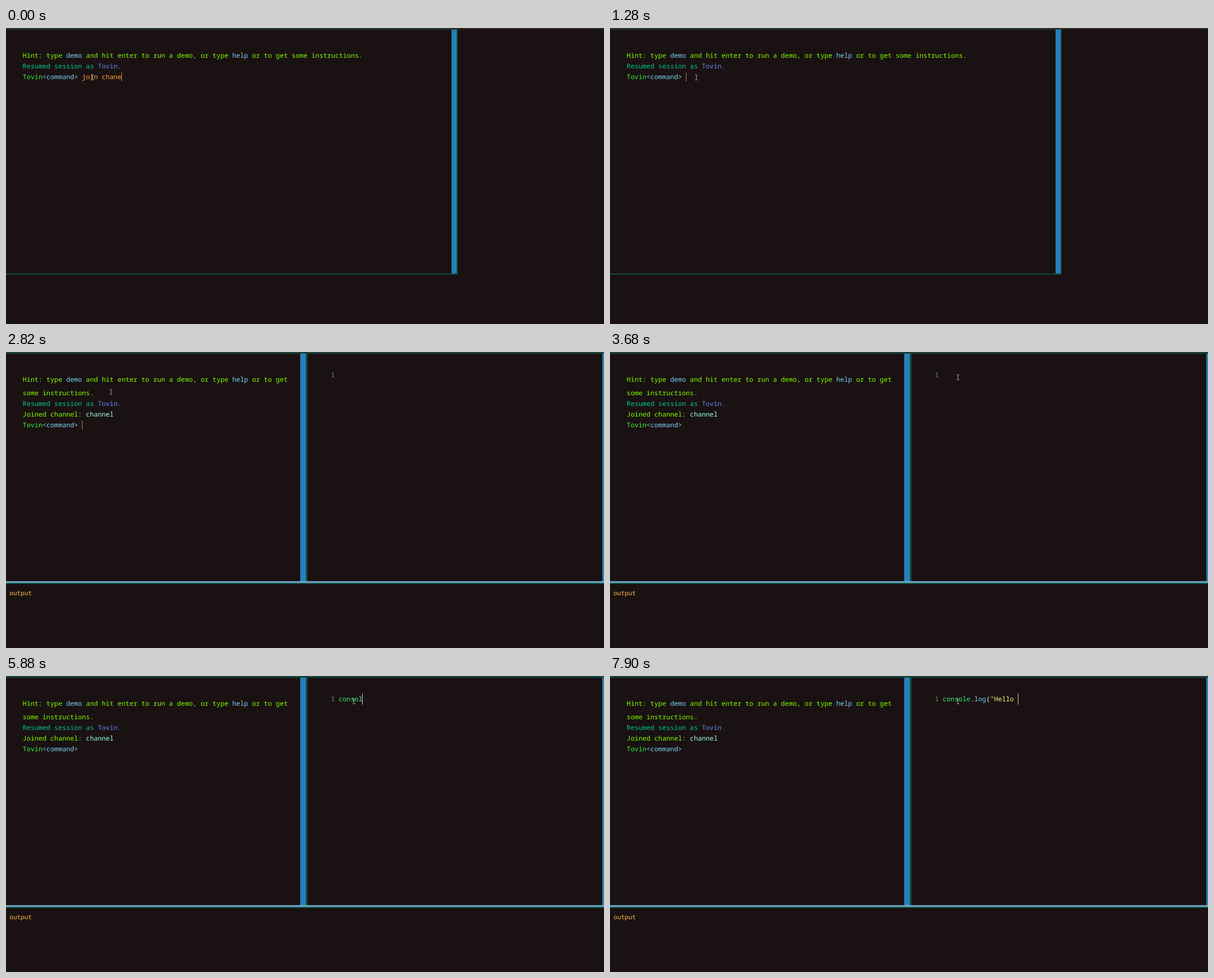
Write an HTML page that moves like this. It is 1063 by 527 pixels and loops after 8 s.

```html
<!DOCTYPE html>
<html lang="en">
<head>
<meta charset="utf-8">
<title>Terminal and editor</title>
<style>
  html, body { margin: 0; width: 100%; height: 100%; overflow: hidden; background: #1a1112; }
  svg { display: block; width: 100%; height: 100%; }
  rect { shape-rendering: crispEdges; }
  text {
    font: 11.73px "Noto Sans Mono", "DejaVu Sans Mono", monospace;
    white-space: pre;
    text-rendering: geometricPrecision;
  }
  .hint { fill: #7fff00; }
  .key { fill: #78d5f5; }
  .info { fill: #00c896; }
  .user { fill: #5f8ff5; }
  .prompt { fill: #3cf53c; }
  .mode { fill: #80d2f2; }
  .input { fill: #ffa53a; }
  .chan { fill: #a0fff0; }
  .line { fill: #818778; }
  .object { fill: #3ceb78; }
  .plain { fill: #f0f0e6; }
  .method { fill: #6ecdfa; }
  .string { fill: #fff578; }
  .output { fill: #ffc04a; font-size: 11px; }
</style>
</head>
<body>
<svg id="stage" viewBox="0 0 1063 527" preserveAspectRatio="none">
  <rect width="1063" height="527" fill="#1a1112"/>
  <rect width="1063" height="2" fill="#2d2a2a"/>
  <g id="single"></g>
  <g id="split"></g>
  <rect id="caret" width="1"/>
  <path id="pointer" d="M-2.5 -4.5H-.5M.5 -4.5H2.5M0 -4V4M-2.5 4.5H-.5M.5 4.5H2.5" fill="none" stroke="#b4aeae"/>
</svg>
<script>
const LOOP = 8000, SPLIT_AT = 1540, CLICK_AT = 3190;
const ADVANCE = 7.037, LEFT = 29.6, CODE_X = 591.3;
const GREEN = '#0f4d40', BLUE = '#2680b8', PALE = '#9fd0ee';
const USER = 'Tovin';
const $ = id => document.getElementById(id);

function add(parent, tag, attrs, content = '') {
  const el = document.createElementNS('http://www.w3.org/2000/svg', tag);
  for (const name in attrs) el.setAttribute(name, attrs[name]);
  el.textContent = content;
  parent.appendChild(el);
  return el;
}

const box = (parent, x, y, width, height, fill) =>
  add(parent, 'rect', { x, y, width, height, fill });

// Each part is [class, string]; returns the spans for later updates.
function write(parent, x, y, ...parts) {
  const line = add(parent, 'text', { x, y });
  return parts.map(([cls, str]) => add(line, 'tspan', { class: cls }, str));
}

const hintStart = [['hint', 'Hint: type '], ['key', 'demo'],
  ['hint', ' and hit enter to run a demo, or type '], ['key', 'help']];
const session = [['info', 'Resumed session as '], ['user', USER], ['info', '.']];
const prompt = [['prompt', USER], ['mode', '<command> ']];

const single = $('single');
box(single, 0, 2, 803, 1, GREEN);
box(single, 801, 2, 2, 437, GREEN);
box(single, 0, 437, 803, 2, GREEN);
box(single, 792, 3, 9, 434, BLUE);
write(single, LEFT, 53, ...hintStart, ['hint', ' or to get some instructions.']);
write(single, LEFT, 72, ...session);
const command = write(single, LEFT, 91, ...prompt, ['input', '']).pop();

const split = $('split');
box(split, 0, 1, 1063, 2, GREEN);
box(split, 523, 3, 10, 405, BLUE);
box(split, 533, 3, 3, 405, GREEN);
box(split, 1060, 3, 3, 405, BLUE);
box(split, 0, 408, 1063, 1, PALE);
box(split, 0, 409, 1063, 1, '#1d5f8c');
box(split, 0, 410, 1063, 1, PALE);
box(split, 0, 411, 1063, 2, GREEN);
write(split, LEFT, 53, ...hintStart, ['hint', ' or to get']);
write(split, LEFT, 77, ['hint', 'some instructions.']);
write(split, LEFT, 96, ...session);
write(split, LEFT, 115, ['hint', 'Joined channel: '], ['chan', 'channel']);
write(split, LEFT, 134, ...prompt);
write(split, 577.5, 45, ['line', '1']);
write(split, 6.3, 433, ['output', 'output']);

const code = [['object', 'console'], ['plain', '.'], ['method', 'log'],
  ['plain', '('], ['string', '"Hello ']];
const codeSpans = write(split, CODE_X, 45, ...code.map(([cls]) => [cls, '']));

// Values that hold from the given time on.
const commands = [[0, 'join chane'], [260, 'join chanel'], [760, 'join chane'],
  [890, 'join chan'], [1020, 'join chann'], [1150, 'join channe'], [1280, '']];
const codeLengths = [[0, 0], [5610, 2], [5750, 4], [5880, 6], [6010, 7], [6140, 8],
  [6300, 10], [6430, 11], [6680, 12], [7080, 13], [7210, 14], [7335, 15],
  [7460, 16], [7590, 17], [7740, 18], [7900, 19]];
const carets = [[0, true], [2050, false], [2580, true], [3680, false],
  [4210, true], [4710, false], [5330, true]];

function at(track, t) {
  let value = track[0][1];
  for (const [start, v] of track) if (t >= start) value = v;
  return value;
}

function placeCaret(x, y, height, fill, on) {
  const attrs = { x: Math.round(x), y, height, fill, visibility: on ? 'visible' : 'hidden' };
  for (const name in attrs) $('caret').setAttribute(name, attrs[name]);
}

// The pointer sweeps over the top in a few discrete moves.
function placePointer(t) {
  const step = Math.max(0, Math.min(6, Math.floor((t - 2580) / 121.6)));
  const p = step / 6, s = p * p * (3 - 2 * p), r = 1 - s;
  const curve = (a, b, c) => r * r * a + 2 * r * s * b + s * s * c;
  const x = curve(153, 380, 618.5), y = curve(88, -36, 44.5);
  $('pointer').setAttribute('transform', `translate(${Math.floor(x) + 0.5} ${Math.round(y)})`);
}

function render(t) {
  const isSplit = t >= SPLIT_AT;
  single.setAttribute('display', isSplit ? 'none' : 'inline');
  split.setAttribute('display', isSplit ? 'inline' : 'none');

  const typed = at(commands, t), length = at(codeLengths, t), on = at(carets, t);
  command.textContent = typed;
  let left = length;
  code.forEach(([, str], i) => {
    codeSpans[i].textContent = str.slice(0, Math.max(0, left));
    left -= str.length;
  });

  if (t >= CLICK_AT) placeCaret(591 + length * ADVANCE, 31, 20, '#d8d4cc', on);
  else if (isSplit) placeCaret(135, 122, 16, '#b08a5c', on);
  else placeCaret(135 + typed.length * ADVANCE, 79, 16, '#c8823c', on);
  placePointer(t);
}

const begin = performance.now();
function tick() {
  render((performance.now() - begin) % LOOP);
  requestAnimationFrame(tick);
}
tick();
</script>
</body>
</html>
```
